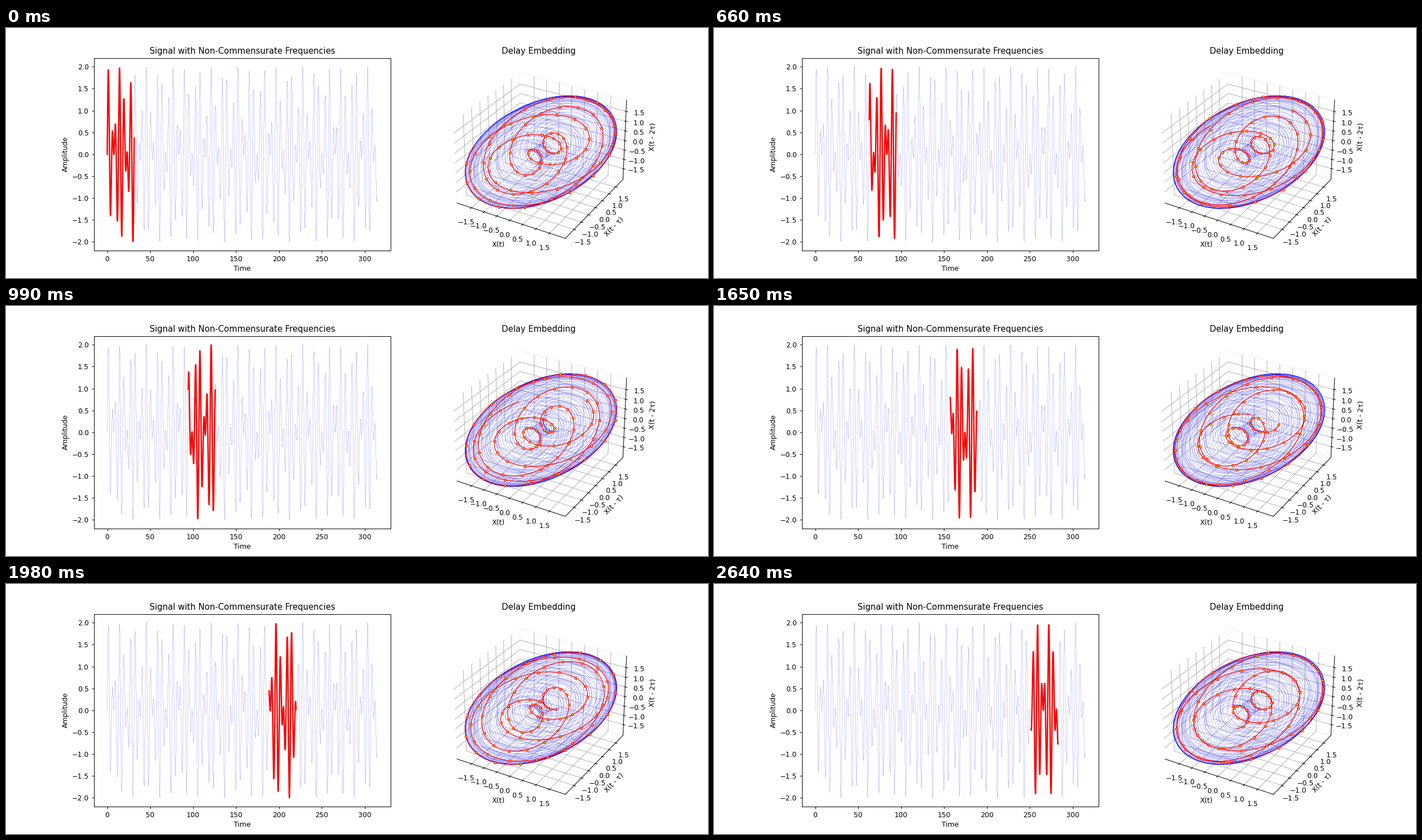
Animation, 1252 px wide and 447 px high, one loop 2970 ms. Source, as a matplotlib script:

```python
import numpy as np
import matplotlib.pyplot as plt
from matplotlib.animation import FuncAnimation

N = 10000        # samples in the whole signal
WINDOW = 1000    # samples highlighted per step
TAU = 20         # delay in samples
STEPS = 9

t = np.linspace(0, 100 * np.pi, N)
signal = np.sin(t) + np.sin(np.sqrt(2) * t)


def embed(x):
    """Three-dimensional delay embedding."""
    return x[:-2 * TAU], x[TAU:-TAU], x[2 * TAU:]


DPI = 89.4
fig = plt.figure(figsize=(1252 / DPI, 447 / DPI), dpi=DPI)
grid = fig.add_gridspec(1, 2, width_ratios=[3, 2])

ax = fig.add_subplot(grid[0])
ax.plot(t, signal, color="blue", lw=0.15)
part, = ax.plot([], [], color="red", lw=2)
ax.set(title="Signal with Non-Commensurate Frequencies",
       xlabel="Time", ylabel="Amplitude")

ax3 = fig.add_subplot(grid[1], projection="3d")
ax3.margins(0)
ax3.plot(*embed(signal), color="blue", lw=0.2)
orbit, = ax3.plot(*embed(signal[:WINDOW]), color="red", lw=1, marker="o",
                  ms=3, mfc="yellow", mec="red", markevery=10)
ticks = np.arange(-1.5, 1.6, 0.5)
ax3.set(title="Delay Embedding", xlabel="X(t)", ylabel="X(t - τ)",
        zlabel="X(t - 2τ)", xticks=ticks, yticks=ticks, zticks=ticks)
for axis in (ax3.xaxis, ax3.yaxis, ax3.zaxis):
    axis.pane.fill = False


def update(step):
    s = slice(step * WINDOW, (step + 1) * WINDOW)
    part.set_data(t[s], signal[s])
    orbit.set_data_3d(*embed(signal[s]))
    return part, orbit


anim = FuncAnimation(fig, update, frames=STEPS, interval=330,
                     repeat=True, repeat_delay=0, blit=False)
plt.show()
```
